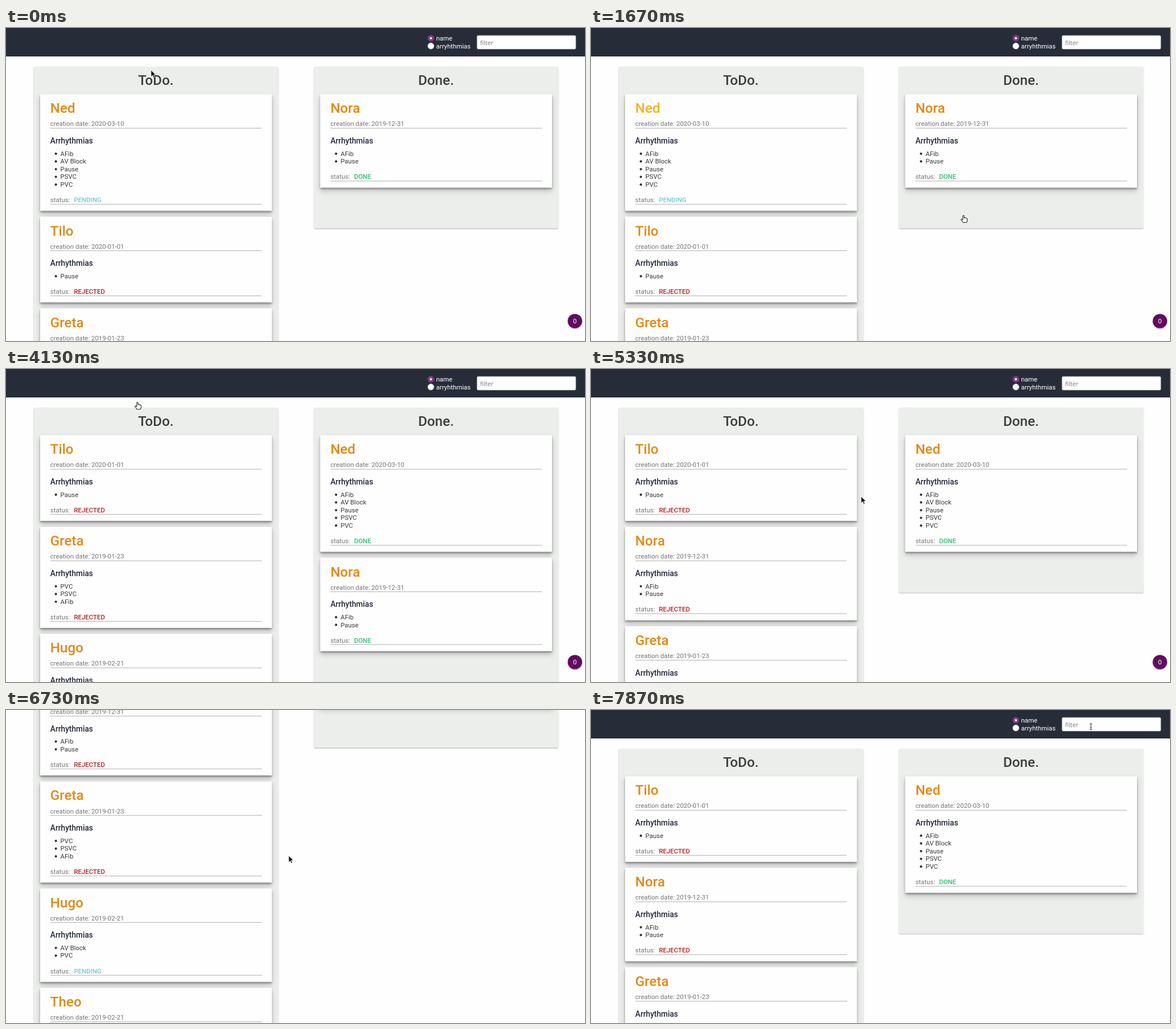
Write an HTML page that moves like this. It is 1018 px wide and 550 px high and loops after 8 s.

```html
<!DOCTYPE html>
<html lang="en">
<head>
<meta charset="utf-8">
<title>Patient board</title>
<style>
  html, body { margin: 0; width: 100%; height: 100%; overflow: hidden; background: #fefefe; }
  svg { display: block; width: 1018px; height: 550px; }
  text { font: 11.43px Roboto, sans-serif; fill: #3a3a3a; }
  .title { font-size: 24.2px; font-weight: 500; fill: #3d3d3d; text-anchor: middle; }
  .name { font-size: 24.2px; font-weight: 500; fill: #e48813; }
  .name.hover { fill: #f3b122; }
  .sub { font-size: 13.71px; font-weight: 500; fill: #22263a; }
  .muted { fill: #757575; }
  .status { font-weight: 500; }
  .light { fill: #fff; }
  .hint { font: 10.8px "Open Sans", "Noto Sans", sans-serif; fill: #777; }
</style>
</head>
<body>
<svg viewBox="0 0 1018 550">
  <defs>
    <filter id="cardShadow" x="-10%" y="-20%" width="120%" height="150%">
      <feDropShadow dx="0" dy="2.6" stdDeviation="1.8" flood-opacity=".34"/>
      <feDropShadow dx="0" dy="5" stdDeviation="4.6" flood-opacity=".2"/>
    </filter>
    <filter id="columnShadow" x="-5%" y="-5%" width="110%" height="110%">
      <feDropShadow dx="0" dy="1.2" stdDeviation="1" flood-opacity=".3"/>
    </filter>
    <filter id="badgeShadow" x="-30%" y="-30%" width="160%" height="160%">
      <feDropShadow dx="0" dy="1" stdDeviation="1.4" flood-opacity=".3"/>
    </filter>
  </defs>
  <rect width="1018" height="550" fill="#fefefe"/>
  <g id="page">
    <g id="board"></g>
    <rect width="1018" height="50" fill="#262d39"/>
    <circle cx="747" cy="18" r="5.8" fill="#84397f"/>
    <circle cx="747" cy="18" r="2" fill="#fff"/>
    <circle cx="747" cy="31.6" r="5.5" fill="#fff" stroke="#bbb" stroke-width=".6"/>
    <text class="light" x="756.3" y="22.2">name</text>
    <text class="light" x="756.3" y="35.8">arryhthmias</text>
    <rect x="828.2" y="13.2" width="173.6" height="23.8" rx="2" fill="#fff" stroke="#c8c8c8" stroke-width=".7"/>
    <text class="hint" x="833.6" y="29.6">filter</text>
  </g>
  <g id="badge">
    <circle cx="1000.3" cy="515" r="12.6" fill="#610861" filter="url(#badgeShadow)"/>
    <text class="light" x="1000.3" y="518.6" text-anchor="middle">0</text>
  </g>
  <g id="cursor">
    <path id="arrow" d="M0 0V11.6L2.7 9.1 4.6 13.4 6.5 12.6 4.6 8.3H8.2Z" fill="#111" stroke="#fff" stroke-width=".7"/>
    <path id="hand" d="M-1.1 1.2Q0-.6 1.1 1.2V4.6Q2.4 3.9 3.1 5 4.4 4.4 5 5.5 6.5 5.2 6.5 6.8V9.4Q6.3 11 5.3 12.8H-.9Q-1.7 11-4 8.5-4.9 7.1-3.5 6.7-2.3 6.7-1.1 8.1Z" fill="#fff" stroke="#222" stroke-width="1.1" stroke-linejoin="round"/>
    <path id="beam" d="M-2.2-4.8H2.2M0-4.8V5.2M-2.2 5.2H2.2M-1.2 1.6H1.2" fill="none" stroke="#333"/>
  </g>
</svg>
<script>
const LOOP = 8000, TICK = 1000 / 15;
const LINE = 13.57, GAP = 10.7, FIRST = 116.5, COLUMN_TOP = 68;
const LEFT = 0, RIGHT = 492.6, CARD_X = 60, CARD_W = 407.4;
const COLOR = { PENDING: '#73cad1', REJECTED: '#b82020', DONE: '#2fc070' };

const patient = (name, date, status, ...items) => ({ name, date, status, items });
const ned = patient('Ned', '2020-03-10', 'PENDING', 'AFib', 'AV Block', 'Pause', 'PSVC', 'PVC');
const tilo = patient('Tilo', '2020-01-01', 'REJECTED', 'Pause');
const greta = patient('Greta', '2019-01-23', 'REJECTED', 'PVC', 'PSVC', 'AFib');
const nora = patient('Nora', '2019-12-31', 'DONE', 'AFib', 'Pause');
const hugo = patient('Hugo', '2019-02-21', 'PENDING', 'AV Block', 'PVC');
const theo = patient('Theo', '2019-02-21', 'PENDING', 'AFib', 'PVC');
const rest = [greta, hugo, theo];

// Moments of the story
const HOVER = 730, DROP_NED = 1730, UNHOVER = 2400, GRAB_NORA = 3400, DROP_NORA = 4400, SCROLL = 5467;

// Pointer glides; "via" is the control point of a curved one
const glide = (start, end, to, via) => ({ start, end, to, via });
const HOME = [255, 74];
const glides = [
  glide(67, 333, [277, 84], [272, 48]),
  glide(467, 733, [148, 133], [330, 98]),
  glide(800, 1467, [655, 329], [1155, 765]),
  glide(2600, 2733, [603, 301]),
  glide(2800, 3133, [486, 286]),
  glide(3200, 3333, [564, 315]),
  glide(3400, 3467, [676, 379]),
  glide(3600, 4133, [231, 58], [1190, 595]),
  glide(4333, 4600, [363, 80]),
  glide(5000, 5333, [475, 224]),
  glide(SCROLL, 6200, [494, 252]),
  glide(6400, 6733, [497, 256]),
  glide(7333, 7733, [837, 43]),
  glide(7800, 7867, [879, 29])
];

const el = id => document.getElementById(id);
const between = (v, a, b) => v >= a && v < b;
const ramp = (t, a, b) => {
  const u = Math.min(1, Math.max(0, (t - a) / (b - a)));
  return u * u * (3 - 2 * u);
};

const text = (x, y, str, cls = '', fill) =>
  `<text x="${x}" y="${y}" class="${cls}"${fill ? ` style="fill:${fill}"` : ''}>${str}</text>`;
const rule = (x, y) => `<rect x="${x}" y="${y - .6}" width="372" height="1.2" fill="#bdbdbd"/>`;
const cardHeight = p => 136.7 + LINE * p.items.length;
const listEnd = list => list.reduce((y, p) => y + cardHeight(p) + GAP, FIRST) - GAP;

function card(p, dx, top, hover) {
  const x = dx + 77.8, end = top + LINE * p.items.length;
  const items = p.items.map((item, i) => {
    const y = top + 108.2 + LINE * i;
    return `<circle cx="${x + 9.9}" cy="${y - 3.8}" r="2.1" fill="#333"/>` + text(x + 17.8, y, item);
  }).join('');
  return `<rect x="${dx + CARD_X}" y="${top}" width="${CARD_W}" height="${cardHeight(p)}" fill="#fefefe" filter="url(#cardShadow)"/>`
    + text(x, top + 32.8, p.name, hover ? 'name hover' : 'name')
    + text(x, top + 55.9, 'creation date: ' + p.date, 'muted') + rule(x, top + 59.6)
    + text(x, top + 86.6, 'Arrhythmias', 'sub') + items
    + text(x, end + 121.7, 'status:', 'muted')
    + text(x + 41.6, end + 121.7, p.status, 'status', COLOR[p.status]) + rule(x, end + 125.3);
}

function column(title, dx, list, hover) {
  const cards = list.map((p, i) => card(p, dx, listEnd(list.slice(0, i)) + GAP, hover && i === 0));
  const height = listEnd(list) + 71.4 - COLUMN_TOP;
  return `<rect x="${dx + 49}" y="${COLUMN_TOP}" width="429.5" height="${height}" rx="2" fill="#eceeec" filter="url(#columnShadow)"/>`
    + text(dx + 263.5, 100.3, title, 'title') + cards.join('');
}

function lists(t) {
  const nedDone = { ...ned, status: 'DONE' };
  if (t < DROP_NED) return [[ned, tilo, ...rest], [nora]];
  if (t < DROP_NORA) return [[tilo, ...rest], [nedDone, nora]];
  return [[tilo, { ...nora, status: 'REJECTED' }, ...rest], [nedDone]];
}

function pointer(t) {
  let from = HOME;
  for (const { start, end, to, via } of glides) {
    if (t < end) {
      const u = ramp(t, start, end);
      return from.map((a, i) => {
        const mid = via ? via[i] : (a + to[i]) / 2;
        return a * (1 - u) ** 2 + 2 * mid * u * (1 - u) + to[i] * u * u;
      });
    }
    from = to;
  }
  return from;
}

function pointerKind(t, x, y, scroll, columns) {
  if (between(x, 828, 1002) && between(y + scroll, 13, 37)) return 'beam';
  const dragging = between(t, HOVER, DROP_NED) || between(t, GRAB_NORA, DROP_NORA);
  const overCard = columns.some((list, i) => {
    const left = (i ? RIGHT : LEFT) + CARD_X;
    return between(x, left, left + CARD_W) && between(y + scroll, FIRST, listEnd(list));
  });
  return dragging || overCard ? 'hand' : 'arrow';
}

let shown = '';
function render(now) {
  const t = Math.floor((now % LOOP + 7) / TICK) * TICK % LOOP;
  const [todo, done] = lists(t);
  const board = column('ToDo.', LEFT, todo, between(t, HOVER, UNHOVER)) + column('Done.', RIGHT, done, false);
  if (board !== shown) el('board').innerHTML = shown = board;

  const page = 163.2;
  const scroll = page * (ramp(t, SCROLL, 6200) + ramp(t, 6400, 6733) - 2 * ramp(t, 6733, 7000));
  el('page').setAttribute('transform', `translate(0 ${-scroll})`);
  el('badge').style.display = t > SCROLL ? 'none' : '';

  const [x, y] = pointer(t), kind = pointerKind(t, x, y, scroll, [todo, done]);
  el('cursor').setAttribute('transform', `translate(${x} ${y})`);
  for (const id of ['arrow', 'hand', 'beam']) el(id).style.display = id === kind ? '' : 'none';
}

const start = performance.now();
function frame() {
  render(performance.now() - start);
  requestAnimationFrame(frame);
}
frame();
</script>
</body>
</html>
```
